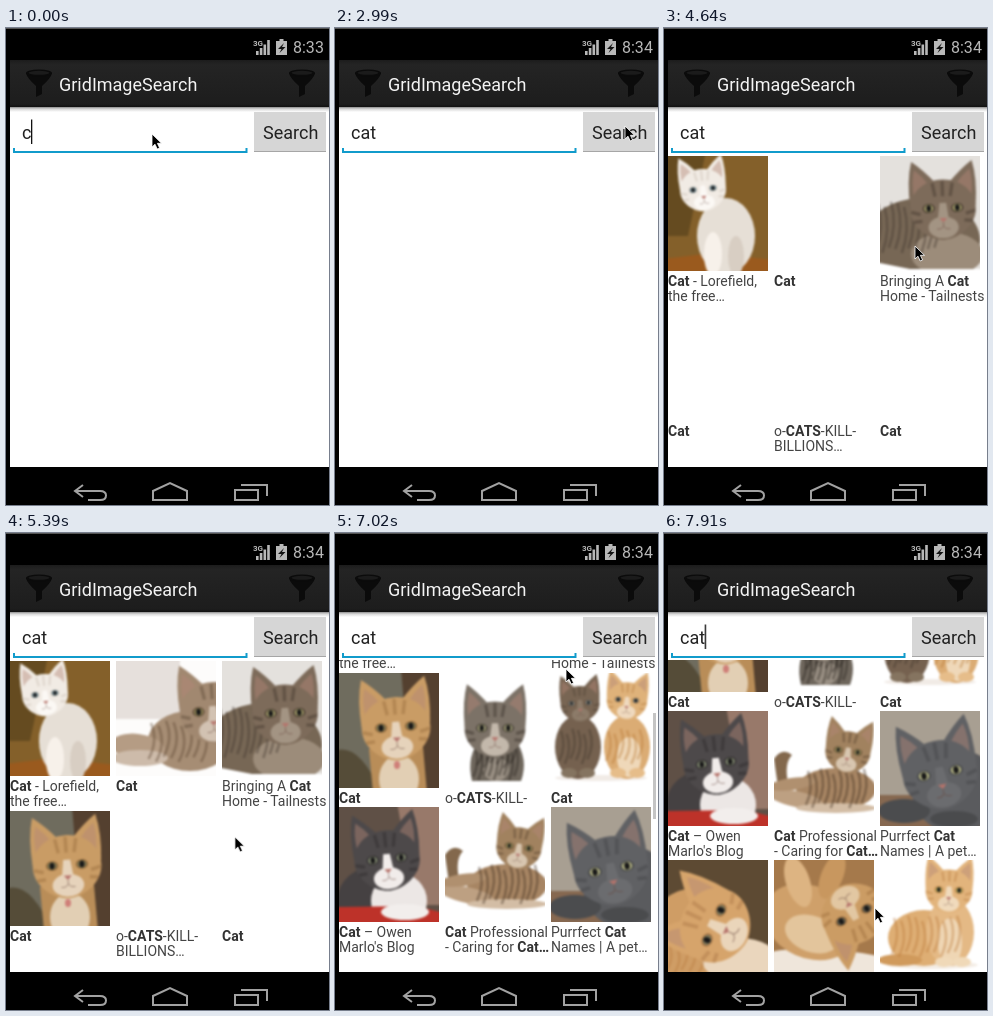
An HTML page for the animation above (8000 ms loop, 323 by 477 pixels).

```html
<!DOCTYPE html>
<html lang="en">
<head>
<meta charset="utf-8">
<title>Image search</title>
<style>
html, body { margin: 0; width: 100%; height: 100%; overflow: hidden; background: #000; }
svg { display: block; }
text { font-family: Roboto, "Liberation Sans", sans-serif; white-space: pre; }
.input { font-size: 18px; fill: #222; }
.caption { font-size: 14px; fill: #444; }
.caption tspan { font-weight: bold; fill: #333; }
.photo { filter: blur(.8px); }
.nav { fill: none; stroke: #a2a2a2; stroke-width: 2; }
</style>
</head>
<body>
<svg id="stage" width="323" height="477" viewBox="0 0 323 477">
  <defs>
    <linearGradient id="bar" x2="0" y2="1">
      <stop stop-color="#1c1c1c"/><stop offset=".1" stop-color="#242424"/>
      <stop offset=".94" stop-color="#1d1d1d"/><stop offset="1" stop-color="#101010"/>
    </linearGradient>
    <linearGradient id="shade" x2="0" y2="1">
      <stop stop-color="#8c8c8c"/><stop offset=".4" stop-color="#d8d8d8"/><stop offset="1" stop-color="#fff"/>
    </linearGradient>
    <clipPath id="list"><rect x="4" y="127" width="319" height="312"/></clipPath>
    <g id="funnel">
      <path d="M0 4Q1 9 10 17V28L16 25V17Q25 9 26 4Z" fill="#0b0b0b"/>
      <ellipse cx="13" cy="4" rx="13" ry="3.6" fill="#0b0b0b"/>
      <ellipse cx="13" cy="3.8" rx="10.5" ry="2" fill="#1b1b1b"/>
    </g>
  </defs>

  <rect width="323" height="1" fill="#555"/>
  <rect x="4" y="79" width="319" height="360" fill="#fff"/>

  <!-- status bar -->
  <g fill="#b8b8b8">
    <text x="247" y="18" font-size="8" font-weight="bold">3G</text>
    <path d="M250 23h2.600v4H250zM253.800 20h2.600v7h-2.600zM257.500 16.500h2.600v10.500h-2.600zM261.200 12h2.600v15h-2.600z"/>
    <path d="M273.500 11h4v2h3.500v14h-11V13h3.500z"/>
    <path d="M278 15l-6 6h3.500l-2 4 6-6h-3.500z" fill="#111"/>
    <text x="287" y="25" font-size="16">8:3</text>
    <text id="early" x="309" y="25" font-size="16">3</text>
    <text id="late" x="309" y="25" font-size="16">4</text>
  </g>

  <!-- action bar -->
  <rect x="4" y="32" width="319" height="47" fill="url(#bar)"/>
  <rect x="4" y="79" width="319" height="5" fill="url(#shade)"/>
  <use href="#funnel" x="20" y="41"/>
  <use href="#funnel" x="283" y="41"/>
  <text x="53" y="63" font-size="18" fill="#f3f3f3">GridImageSearch</text>

  <!-- search row -->
  <path d="M8 120V124H240.500V120" fill="none" stroke="#119bcb" stroke-width="2"/>
  <text class="input" x="16" y="111">c<tspan id="a">a</tspan><tspan id="t">t</tspan></text>
  <rect id="caret" y="91.500" width="1.300" height="24.500" fill="#111"/>
  <rect id="button" x="248" y="84" width="72" height="40"/>
  <rect x="248" y="123" width="72" height="1" fill="#a6a6a6"/>
  <text class="input" x="257" y="111">Search</text>

  <!-- results -->
  <g clip-path="url(#list)"><g id="grid"></g></g>
  <rect id="thumb" x="318" y="128" width="3" height="106" fill="#c4c4c4"/>

  <!-- navigation bar -->
  <g class="nav">
    <path d="M77 457L69 463L77 469M69 463H94Q100 463 100 467.500T94 472H82"/>
    <path d="M147 472V463L164 455L181 463V472Z"/>
    <path d="M229 462H252V472H229ZM235 457H261V468"/>
  </g>

  <path id="mouse" d="M0 0V13L3 10.200L5.200 15L7.600 14L5.400 9.300H9.500Z" stroke="#fff" stroke-width=".8"/>
</svg>

<script>
const LOOP = 8000, LEAD = 10;
const $ = id => document.getElementById(id);
const move = (x, y) => `translate(${x}px,${y}px)`;

// ---- timeline: [time, value, steps on the way to the next value] ----
const rules = [], used = {};
function track(id, prop, keys) {
  const name = `${id}-${prop}`;
  const body = keys.map(([time, value, steps]) => {
    const at = time < LOOP ? Math.max(0, time - LEAD) : LOOP;
    const ease = steps ? `steps(${steps},start)` : 'step-end';
    return `${at / LOOP * 100}%{${prop}:${value};animation-timing-function:${ease}}`;
  });
  rules.push(`@keyframes ${name}{${body.join('')}}`);
  (used[id] ||= []).push(`${name} ${LOOP}ms infinite`);
}
const toggle = (id, times, on = false) =>
  track(id, 'visibility', [0, ...times].map((t, i) => [t, (i % 2 === 0) === on ? 'visible' : 'hidden']));

// ---- cat pictures, drawn in a 100 x 115 box ----
const path = (d, fill) => `<path d="${d}" fill="${fill}"/>`;
const oval = (x, y, rx, ry, fill, turn = 0) =>
  `<ellipse cx="${x}" cy="${y}" rx="${rx}" ry="${ry}" fill="${fill}" transform="rotate(${turn} ${x} ${y})"/>`;
const back = fill => `<rect x="-5" y="-5" width="110" height="125" fill="${fill}"/>`;

function stripes(x, y, w, h, n, color) {
  let d = '';
  for (let i = 0; i < n; i++) {
    const sx = x + w * i / n;
    d += `M${sx} ${y + 3 * Math.sin(i * 2)}q${w / n} ${h / 2} ${-w / n / 3} ${h}`;
  }
  return `<path d="${d}" fill="none" stroke="${color}" stroke-width="2.500" opacity=".4"/>`;
}

function face(x, y, size, turn, fur, dark, eye, muzzle) {
  const ear = side => `<g transform="scale(${side} 1)">`
    + path('M-39 -2Q-42 -34 -36 -56Q-22 -46 -8 -30Z', fur)
    + `<g opacity=".45">${path('M-34 -14Q-37 -32 -33 -46Q-23 -38 -16 -28Z', '#b48878')}</g></g>`;
  const look = ex => oval(ex, 0, 7, 5.5, dark) + oval(ex, 0, 5.5, 4.5, eye) + oval(ex, 0, 2.8, 3.8, '#181818');
  return `<g transform="translate(${x} ${y}) rotate(${turn}) scale(${size})">`
    + ear(1) + ear(-1)
    + path('M0 -34C22 -34 38 -20 39 0C40 20 20 37 0 38C-20 37 -40 20 -39 0C-38 -20 -22 -34 0 -34Z', fur)
    + `<path d="M-12 -30L-9 -14M0 -32V-14M12 -30L9 -14M-38 4L-27 7M38 4L27 7M-35 16L-25 15M35 16L25 15"
        stroke="${dark}" stroke-width="4" opacity=".4"/>`
    + oval(0, 23, 18, 13, muzzle) + path('M-4 -6H4L7 16H-7Z', muzzle)
    + look(-17) + look(17)
    + path('M-4.500 12H4.500L0 17Z', '#b5736b')
    + '<path d="M0 17V22M-8 25Q-3 26 0 22Q3 26 8 25" fill="none" stroke="#68483f" opacity=".6"/></g>';
}

const cats = [
  back('#84602a') + path('M-5 -5H38L20 80H-5Z', '#654b20') + path('M-5 103L45 97L105 104V120H-5Z', '#9a5a1e')
    + oval(58, 80, 29, 38, '#e6dfd6') + oval(45, 98, 9, 22, '#f7f1ea') + oval(68, 100, 8, 20, '#d8cec3')
    + face(35, 33, .59, -6, '#f1ebe4', '#c8bcb0', '#6d8b96', '#fbf8f4'),

  back('#fdfcfb') + path('M-5 -5H64V58H-5Z', '#e6e0dc') + oval(74, 80, 42, 30, '#a68d74')
    + oval(22, 86, 27, 13, '#b59c84', 8) + oval(24, 97, 28, 8, '#cdbbaa') + stripes(35, 62, 60, 36, 8, '#59432f')
    + face(97, 50, .85, -4, '#a18870', '#564331', '#8f8456', '#d2c2b2'),

  back('#e4e1dd') + oval(42, 84, 58, 42, '#776755') + oval(67, 98, 36, 22, '#9c8c7a')
    + stripes(-2, 48, 65, 46, 10, '#40362d')
    + face(63, 52, .84, -2, '#7d6b5a', '#3c3128', '#a7a06c', '#a39483') + path('M-5 106L30 113H105V120H-5Z', '#fff'),

  back('#6f6c5e') + path('M62 -5H105V120H72Z', '#54402f') + path('M-5 78Q20 68 42 120H-5Z', '#554c38')
    + path('M30 76Q58 60 84 74L88 120H34Z', '#b98d58') + oval(60, 106, 20, 24, '#e2cfb4')
    + face(57, 54, .88, -4, '#c99c65', '#94683a', '#7d7550', '#e6d3bb') + oval(58, 92, 3, 4, '#cf7f78'),

  back('#fff') + path('M27 108Q21 82 36 66H70Q84 86 76 108Z', '#6f675d') + oval(51, 96, 13, 12, '#9a9084')
    + stripes(30, 74, 46, 30, 9, '#26221d') + stripes(34, 70, 40, 22, 6, '#26221d')
    + face(50, 55, .78, 0, '#7c7267', '#2f2923', '#a4a07a', '#c3b8ab'),

  back('#fff') + oval(50, 105, 46, 3, '#f1ebe6') + oval(27, 74, 23, 32, '#75614f')
    + oval(76, 74, 23, 32, '#dbac74') + oval(78, 84, 12, 20, '#efd8b9')
    + oval(18, 100, 8, 5, '#857460') + oval(36, 100, 8, 5, '#857460')
    + oval(67, 100, 8, 5, '#e6bd8a') + oval(86, 100, 8, 5, '#e6bd8a')
    + stripes(10, 58, 34, 30, 6, '#43372c') + stripes(57, 58, 38, 30, 6, '#b67935')
    + face(29, 30, .5, -3, '#786553', '#483b2f', '#9ca09a', '#8c7b69')
    + face(76, 27, .52, 4, '#dfb27a', '#b47a3e', '#7f8c8c', '#efd9be'),

  back('#5f5046') + path('M58 -5H105V98H76Z', '#98796a') + oval(40, 94, 42, 36, '#454142')
    + oval(60, 94, 28, 28, '#ece7e5') + path('M-5 100L78 99L105 106V120H-5Z', '#bd3229')
    + oval(66, 105, 24, 8, '#f2eeec')
    + face(48, 52, .84, -6, '#4d494a', '#2b2829', '#858c74', '#f1ecea'),

  back('#fff') + path('M0 48Q8 36 18 44Q10 52 14 72L4 76Z', '#83684c') + oval(62, 78, 40, 21, '#a78563')
    + oval(22, 88, 28, 8, '#bda082', 12) + oval(18, 73, 24, 6, '#b0906f', -8) + oval(62, 97, 40, 5, '#d3bda5')
    + stripes(34, 60, 62, 34, 10, '#3d2b1c')
    + face(74, 40, .58, 8, '#a1825f', '#4b3826', '#a39a60', '#d8c6b0'),

  back('#a89f92') + path('M-5 84H105V120H-5Z', '#866850') + oval(76, 80, 44, 42, '#5a5b5e')
    + oval(24, 100, 26, 12, '#4b4c4e') + face(60, 62, .96, -11, '#606164', '#414245', '#b3b384', '#6b6c6f')
    + oval(74, 108, 24, 8, '#4a4b4d'),

  back('#5d4a33') + oval(28, 78, 50, 50, '#cf9d65') + oval(72, 100, 38, 22, '#ead6bd')
    + stripes(0, 82, 40, 30, 5, '#b67a3f')
    + face(46, 65, .97, -65, '#d6a46b', '#a87444', '#7d7658', '#ead5ba'),

  back('#a5794b') + path('M-5 92Q40 84 105 96V120H-5Z', '#efe6db') + oval(36, 62, 48, 36, '#cfa06a', 24)
    + oval(24, 22, 12, 26, '#ddb482', -18) + oval(58, 16, 11, 24, '#c8975f', 22)
    + oval(38, 74, 28, 18, '#e3c59c', 20)
    + face(80, 55, .84, 153, '#cb9c64', '#986838', '#5d5a4a', '#e2c7a2'),

  back('#fff') + oval(52, 105, 46, 4, '#f3ece4') + oval(44, 78, 36, 28, '#deae74')
    + oval(70, 72, 24, 34, '#e4b985') + oval(70, 82, 12, 24, '#efd6b4') + oval(20, 100, 22, 6, '#d09a5c')
    + oval(64, 102, 9, 5, '#f0d9b8') + oval(82, 102, 9, 5, '#f0d9b8') + stripes(14, 58, 70, 36, 10, '#b9793a')
    + face(69, 30, .6, 2, '#e2b47c', '#b87d42', '#a5a05c', '#f0dabc'),
];

// ---- grid: tops of rows, captions (* marks bold) and load times ----
const tops = [128, 278, 412, 561];
const captions = [
  ['*Cat* - Lorefield,', 'the free…'], ['*Cat*'], ['Bringing A *Cat*', 'Home - Tailnests'],
  ['*Cat*'], ['o-*CATS*-KILL-', 'BILLIONS…'], ['*Cat*'],
  ['*Cat* – Owen', "Marlo's Blog"], ['*Cat* Professional', '- Caring for *Cat…*'], ['Purrfect *Cat*', 'Names | A pet…'],
];
const loads = [4190, 4940, 4490, 5240, 5540, 5840, 5990, 6130, 6130, 7470, 7620, 7770];
const bold = s => s.replace(/\*(.+?)\*/g, '<tspan>$1</tspan>');

$('grid').innerHTML = cats.map((cat, i) => {
  const x = 4 + 106 * (i % 3), y = tops[i / 3 | 0];
  toggle(`cat${i}`, [loads[i]]);
  const lines = (captions[i] || []).map((line, n) => {
    const id = `line${i}-${n}`;
    toggle(id, i === 4 && n ? [3440, 5690] : [i < 6 ? 3440 : 5990]);
    return `<text class="caption" id="${id}" x="${x}" y="${y + 130 + 15 * n}">${bold(line)}</text>`;
  });
  return `<svg id="cat${i}" x="${x}" y="${y}" width="100" height="115"><g class="photo">${cat}</g></svg>${lines.join('')}`;
}).join('');

// ---- typing, clock, button ----
toggle('a', [150]);
toggle('t', [450]);
track('caret', 'transform', [[0, move(25, 0)], [150, move(34.7, 0)], [450, move(40.7, 0)]]);
toggle('caret', [890, 1490, 2090, 2540, 2990, 4190, 4340, 4790, 5240, 5690, 6130, 6570, 7020, 7470], true);
toggle('early', [2090], true);
toggle('late', [2090]);
track('button', 'fill', [[0, '#d6d6d6'], [1490, '#bfbfbf'], [2090, '#d6d6d6']]);

// ---- pointer ----
track('mouse', 'transform', [
  [0, move(146, 106)], [750, move(146, 106), 6], [1640, move(290, 98)],
  [3440, move(290, 98), 4], [4040, move(251, 218)],
  [4790, move(251, 218), 3], [5240, move(240, 280), 8], [6430, move(195.5, 375.5), 5],
  [7170, move(231, 136), 3], [7620, move(226, 164), 3], [LOOP, move(211, 375)],
]);

// ---- drag, then a slowing fling ----
const scroll = [[0, 0], [6570, 0, 4], [7160, 138], [7170, 188], [7320, 218], [7470, 234]];
const follow = (id, rate) =>
  track(id, 'transform', scroll.map(([t, y, steps]) => [t, move(0, y * rate), steps]));
follow('grid', -1);
follow('thumb', .377);
track('thumb', 'opacity', [[0, 0], [6430, 1], [7770, .5], [7910, 0]]);

for (const id in used) rules.push(`#${id}{animation:${used[id].join(',')}}`);
document.head.appendChild(document.createElement('style')).textContent = rules.join('\n');
</script>
</body>
</html>
```
